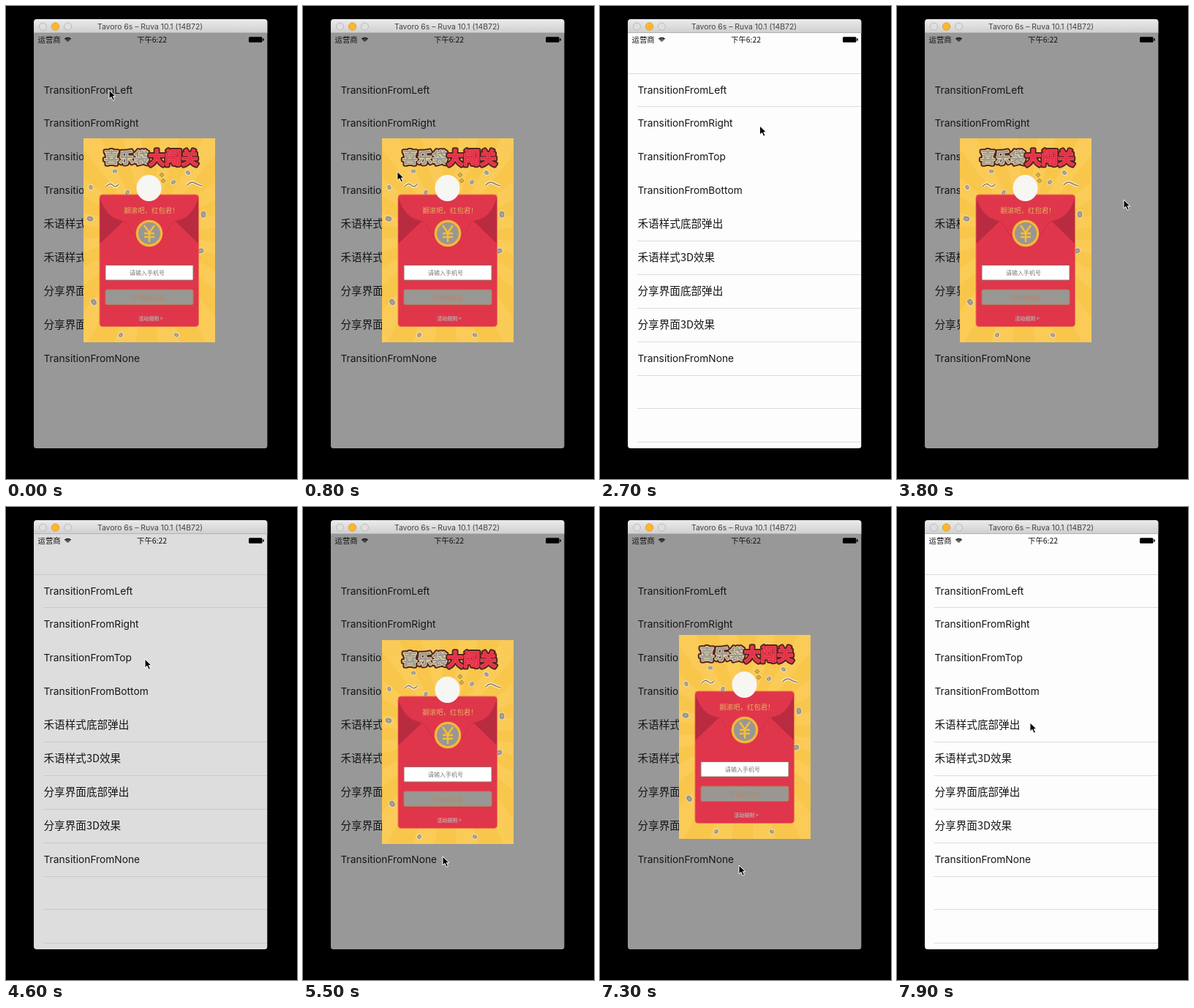
Write an HTML page with a canvas that moves like this. It is 398 px wide and 647 px high and loops after 8 s.

```html
<!DOCTYPE html>
<html lang="zh">
<head>
<meta charset="utf-8">
<style>
html, body { margin: 0; width: 398px; height: 647px; overflow: hidden; background: #000; }
canvas { display: block; }
</style>
</head>
<body>
<canvas id="stage" width="398" height="647"></canvas>
<script>
const ctx = document.getElementById('stage').getContext('2d');
const LOOP = 8000;
const LATIN = 'Inter, "Noto Sans CJK SC", sans-serif';
const CJK = '"Noto Sans CJK SC", "Noto Sans CJK", sans-serif';
const SCREEN = { x: 38, y: 36, w: 319.5, h: 569 };
const CARD = { x: 108, y: 181, w: 180, h: 279 };
const GRAY = '#999793';

const ROWS = [
  'TransitionFromLeft', 'TransitionFromRight', 'TransitionFromTop', 'TransitionFromBottom',
  '禾语样式底部弹出', '禾语样式3D效果', '分享界面底部弹出', '分享界面3D效果',
  'TransitionFromNone'
];

// dx, dy point along the travel, which continues out through the far side
const POPUPS = [
  { open: -520, close: 1503, dx: 1, dy: 0 },
  { open: 2950, close: 3703, dx: -1, dy: 0 },
  { open: 4680, close: 5470, dx: 0, dy: 1 },
  { open: 6505, close: 7250, dx: 0, dy: -1 }
];
const EXIT = 350;

// time, x, y
const PATH = [
  [0, 141, 115], [300, 141, 118], [900, 128, 235], [1200, 172, 121],
  [1800, 172, 121], [2500, 218.5, 164], [3000, 218.5, 164], [3400, 361, 238],
  [3700, 310, 265], [3950, 310, 265], [4450, 190, 208], [4750, 190, 208],
  [5250, 191, 478], [5700, 191, 478], [6300, 183.5, 252], [6650, 183.5, 252],
  [7100, 190, 490], [7350, 190, 490], [7800, 182, 295], [8000, 182, 295]
];

const clamp = v => Math.max(0, Math.min(1, v));
const smooth = p => p * p * (3 - 2 * p);
const easeInOut = p => p < 0.5 ? 4 * p ** 3 : 1 - 4 * (1 - p) ** 3;

function spring(ms) {
  if (ms <= 0) return 0;
  const phase = Math.PI * ms / 260, decay = 0.77;
  return 1 - Math.exp(-decay * phase) * (Math.cos(phase) + decay * Math.sin(phase));
}

function text(str, x, y, size, color, align = 'left', family = CJK, weight = 400) {
  ctx.font = `${weight} ${size}px ${family}`;
  ctx.textAlign = align;
  ctx.textBaseline = 'alphabetic';
  ctx.fillStyle = color;
  ctx.fillText(str, x, y);
}

function box(x, y, w, h, r, fill, stroke) {
  ctx.beginPath();
  ctx.roundRect(x, y, w, h, r);
  paint(fill, stroke);
}

function disc(x, y, r, fill, stroke, width) {
  ctx.beginPath();
  ctx.arc(x, y, r, 0, 2 * Math.PI);
  paint(fill, stroke, width);
}

function shape(d, fill, stroke, width) {
  const p = new Path2D(d);
  if (fill) { ctx.fillStyle = fill; ctx.fill(p); }
  if (stroke) { ctx.strokeStyle = stroke; ctx.lineWidth = width || 1; ctx.stroke(p); }
}

function paint(fill, stroke, width = 1) {
  if (fill) { ctx.fillStyle = fill; ctx.fill(); }
  if (stroke) { ctx.strokeStyle = stroke; ctx.lineWidth = width; ctx.stroke(); }
}

function drawTitleBar() {
  const g = ctx.createLinearGradient(0, 18, 0, 36);
  g.addColorStop(0, '#ebebeb');
  g.addColorStop(1, '#d0d0d0');
  box(SCREEN.x, 18, SCREEN.w, 18, [4, 4, 0, 0], g);
  ctx.fillStyle = '#b4b4b4';
  ctx.fillRect(SCREEN.x, 36, SCREEN.w, 1);
  disc(50.5, 28, 5, '#dfdfdf', '#b0b0b0', 0.8);
  disc(67.5, 28, 5.2, '#fdb62d', '#d99a35', 0.8);
  disc(84.5, 28, 5, '#dfdfdf', '#b0b0b0', 0.8);
  text('Tavoro 6s – Ruva 10.1 (14B72)', 197, 32, 10.4, '#444', 'center', LATIN);
}

function drawStatusBar() {
  text('运营商', 43.5, 50, 10.4, '#111');
  ctx.lineCap = 'butt';
  for (const r of [2, 4, 6]) {
    ctx.beginPath();
    ctx.arc(84.5, 49.5, r, -2.35, -0.79);
    paint(null, '#111', 1.3);
  }
  text('下午6:22', 199.5, 49.5, 10.4, '#111', 'center');
  box(332, 42.3, 18.5, 7.5, 1.5, '#000');
  box(351.2, 44.3, 1.6, 3.5, 0.8, '#000');
}

function drawList(dim) {
  ctx.fillStyle = '#fdfdfd';
  ctx.fillRect(SCREEN.x, SCREEN.y, SCREEN.w, SCREEN.h);
  ctx.globalAlpha = 1 - dim;
  ctx.fillStyle = '#dcdcdc';
  ctx.fillRect(38, 92, 319, 1);
  for (let i = 0; i < 11; i++) {
    if (i < 1 || i > 3) ctx.fillRect(51, Math.round(137.3 + i * 45.9), 306, 1);
  }
  ctx.globalAlpha = 1;
  ctx.fillStyle = `rgba(0,0,0,${0.4 * dim})`;
  ctx.fillRect(SCREEN.x, SCREEN.y, SCREEN.w, SCREEN.h);
  drawStatusBar();
  ROWS.forEach((label, i) => {
    const y = 119.5 + i * 45.9;
    if (label.startsWith('T')) text(label, 51.5, y, 13.75, '#161616', 'left', LATIN);
    else text(label, 51.5, y, 14.6, '#161616', 'left', CJK, 300);
  });
}

function drawRays() {
  ctx.fillStyle = '#f9c64c';
  ctx.fillRect(0, 0, CARD.w, CARD.h);
  ctx.fillStyle = '#fbcb58';
  for (let i = 0; i < 16; i++) {
    const a = i * Math.PI / 8 + 0.12;
    ctx.beginPath();
    ctx.moveTo(90, 130);
    ctx.arc(90, 130, 190, a, a + 0.19);
    ctx.fill();
  }
}

function drawConfetti() {
  const bits = [[43, 45], [10, 67], [123, 60], [143, 47], [60, 74], [9, 110],
    [164, 104], [160, 154], [14, 224], [51, 269], [127, 269]];
  bits.forEach(([x, y], i) => {
    ctx.save();
    ctx.translate(x, y);
    ctx.rotate(i * 1.3);
    const r = i > 4 && i < 9 ? 5 : 3.8;
    ctx.beginPath();
    ctx.ellipse(0, 0, r, r * 0.8, 0, 0, 2 * Math.PI);
    paint(GRAY, '#f8e0a4', 1);
    shape('M-1.5 0L1.5 0', null, '#d8c48f', 0.9);
    ctx.restore();
  });
  for (const d of ['M31 66Q36 60 40 64T48 63', 'M142 64Q147 58 152 61T162 65']) {
    shape(d, null, '#fff0c4', 4);
    shape(d, null, '#85806f', 1.6);
  }
  for (const [x, y] of [[107, 50], [109, 58]]) {
    shape(`M${x} ${y - 3}L${x + 3} ${y}L${x} ${y + 3}L${x - 3} ${y}Z`, '#d7b143', '#80763f', 0.7);
  }
}

function headline(str, x, y, size, fill, edge) {
  ctx.font = `900 ${size}px ${CJK}`;
  ctx.textAlign = 'left';
  ctx.lineJoin = 'round';
  for (const [color, width] of [['#54251e', 6], [edge, 2]]) {
    ctx.strokeStyle = color;
    ctx.lineWidth = width;
    ctx.strokeText(str, x, y);
  }
  ctx.fillStyle = fill;
  ctx.fillText(str, x, y);
}

function drawEnvelope() {
  box(22, 77, 135.5, 180.5, 4, '#e0364b', '#ef7448');
  shape('M22.5 84Q30 102 56 112L22.5 144Z', '#b92b40');
  shape('M157 84Q149 102 124 112L157 144Z', '#b92b40');
  shape('M22.5 82Q31 108 50 112Q57 113 61 120Q69 139 90 145Q111 139 118 120Q122 113 130 112Q149 108 157 82',
    '#e0364b', '#c92c43', 0.8);
  text('翻滚吧，红包君！', 93, 102, 9.4, '#e0b060', 'center', CJK, 500);

  disc(90, 130, 18.3, '#f4b83b');
  disc(90, 130, 15, GRAY);
  shape('M83 119L90 129L97 119M90 129V142M83 130H97M83 135H97', null, '#f8bd35', 2.4);

  box(30, 173.5, 120, 20.5, 1, '#fff', '#8f7471');
  text('请输入手机号', 87, 186.8, 8, '#777', 'center');
  box(30, 207, 120, 20.5, 2, GRAY, '#b77b58');
  text('开始领红包', 90, 220.5, 8.5, '#b98560', 'center', CJK, 300);
  text('活动规则 >', 92, 249, 7, '#b9aaa6', 'center', CJK, 700);
}

function drawCard(x, y) {
  ctx.save();
  ctx.translate(Math.round(x), Math.round(y));
  ctx.beginPath();
  ctx.rect(0, 0, CARD.w, CARD.h);
  ctx.clip();
  drawRays();
  drawConfetti();
  headline('喜乐袋', 28, 34, 20.5, GRAY, '#e4d5a6');
  headline('大闯关', 89, 35, 22.5, '#e5304a', '#f04757');
  drawEnvelope();
  ctx.beginPath();
  ctx.ellipse(89.5, 68, 17, 18, 0, 0, 2 * Math.PI);
  paint('#f6f6f3');
  ctx.restore();
}

function popupState(t) {
  const p = POPUPS.find(q => t >= q.open - 110 && t < q.close + EXIT);
  if (!p) return { dim: 0 };
  const entry = spring(t - p.open) - 1;
  const out = easeInOut(clamp((t - p.close) / EXIT));
  const fadeIn = clamp((t - p.open + 110) / 100);
  const fadeOut = clamp((t - p.close - 110) / (EXIT - 110));
  const shift = entry + out;
  return {
    dim: fadeIn * (1 - fadeOut),
    x: CARD.x + p.dx * shift * 250,
    y: CARD.y + p.dy * shift * 424,
    visible: t > p.open
  };
}

function cursorAt(t) {
  const i = PATH.findIndex(k => k[0] > t);
  const [t0, x0, y0] = PATH[i - 1], [t1, x1, y1] = PATH[i];
  const p = smooth((t - t0) / (t1 - t0));
  return [x0 + (x1 - x0) * p, y0 + (y1 - y0) * p];
}

function drawCursor(x, y) {
  ctx.save();
  ctx.translate(x, y);
  ctx.lineJoin = 'miter';
  shape('M0 0V12L3 9.4L5.2 14.3L7.5 13.2L5.3 8.7H9Z', '#000', '#fff', 1);
  ctx.restore();
}

function draw(t) {
  ctx.fillStyle = '#000';
  ctx.fillRect(0, 0, 398, 647);
  const state = popupState(t);
  ctx.save();
  ctx.beginPath();
  ctx.roundRect(SCREEN.x, SCREEN.y, SCREEN.w, SCREEN.h, [0, 0, 4, 4]);
  ctx.clip();
  drawList(state.dim);
  if (state.visible) drawCard(state.x, state.y);
  ctx.restore();
  drawTitleBar();
  drawCursor(...cursorAt(t));
}

const start = performance.now();
function tick() {
  draw((performance.now() - start) % LOOP);
  requestAnimationFrame(tick);
}
tick();
</script>
</body>
</html>
```
